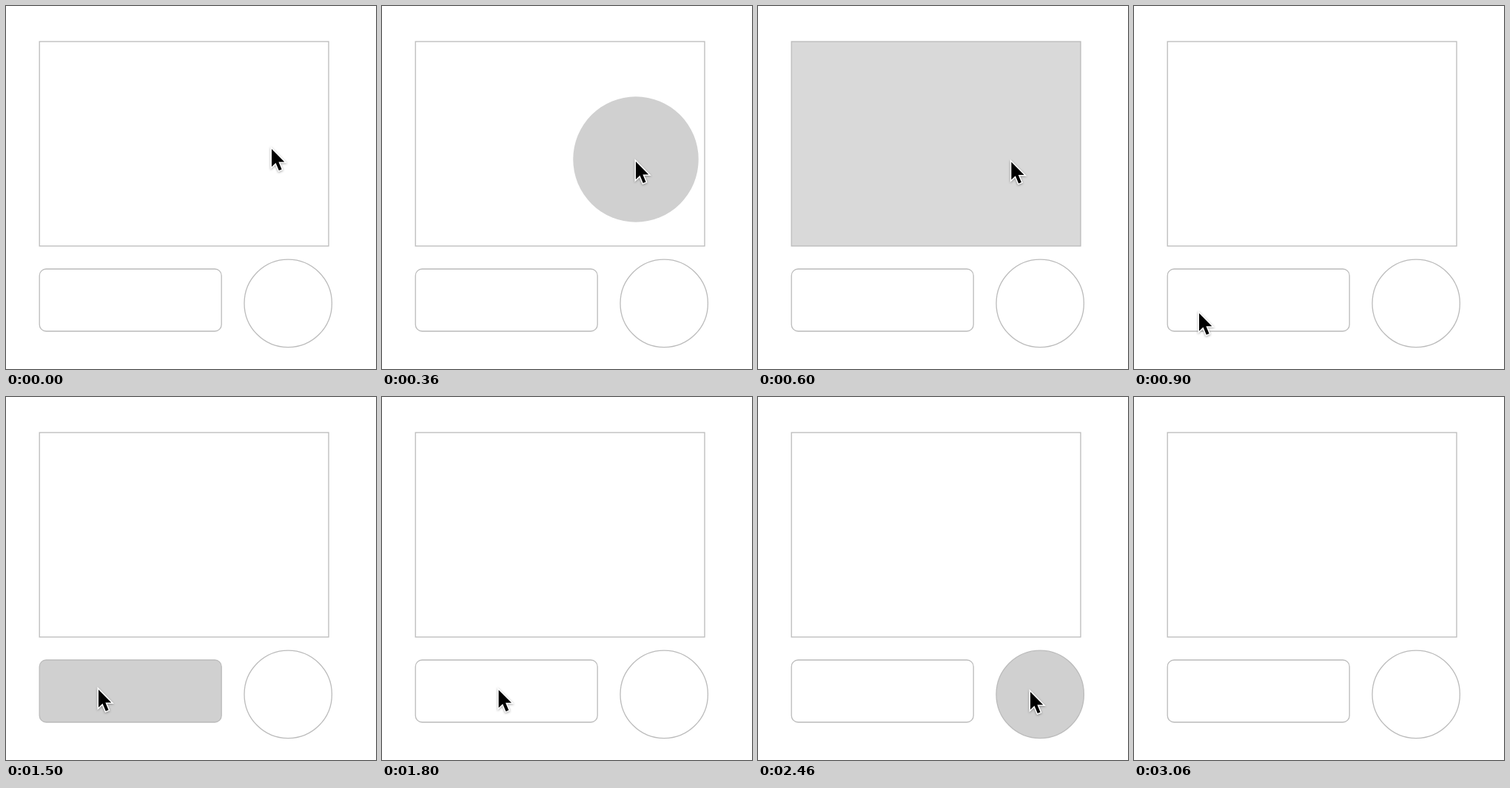
Recreate the animation shown at these times as an HTML page. Size 500 by 490 pixels, loop 3.42 s.

```html
<!DOCTYPE html>
<html lang="en">
<head>
<meta charset="utf-8">
<title>Ripple surfaces</title>
<style>
  html, body { margin: 0; width: 100%; height: 100%; overflow: hidden; background: #fff; }
  svg { display: block; width: 500px; height: 490px; }
  .outline { fill: none; stroke: #bbb; stroke-width: 1.3; }
  .ripple { fill: #d0d0d0; }
  #pointer { filter: drop-shadow(0 1.5px 1.5px rgba(0, 0, 0, .35)); }
</style>
</head>
<body>
<svg viewBox="0 0 500 490">
  <defs>
    <rect id="card" x="45.2" y="48" width="390.8" height="276"/>
    <rect id="button" x="45.2" y="355" width="246" height="84" rx="9"/>
    <circle id="disc" cx="381.2" cy="401.4" r="59.2"/>
    <clipPath id="clip-card"><use href="#card"/></clipPath>
    <clipPath id="clip-button"><use href="#button"/></clipPath>
    <clipPath id="clip-disc"><use href="#disc"/></clipPath>
  </defs>
  <g id="surfaces"></g>
  <path id="pointer" d="M0 0V24L5.5 18.8L9.8 29L13.6 27.4L9.4 17.4H17.3Z"
        fill="#000" stroke="#fff" stroke-width="3" paint-order="stroke"/>
</svg>
<script>
const LOOP = 3420, STEP = 60;
const GROW = 240, FADE = 200, FIRST_PRESS = 300, PRESS_GAP = 960;
const SVG = 'http://www.w3.org/2000/svg';
const pointer = document.getElementById('pointer');
const layer = document.getElementById('surfaces');

const entry = { x: 359, y: 193 };
const onCard = { x: 343, y: 210 };
const onButton = { x: 125, y: 395 };
const onDisc = { x: 368, y: 398 };
const exit = { x: 123, y: 497 };

// Each move rests at its end until the next one starts; `via` bends the path.
const moves = [
  { from: entry, to: onCard, start: 0, end: 240 },
  { from: onCard, to: onButton, start: 560, end: 1240, via: { x: -58, y: 527 } },
  { from: onButton, to: onDisc, start: 1600, end: 2220 },
  { from: onDisc, to: exit, start: 2600, end: 3060 }
];

const clamp = v => Math.max(0, Math.min(1, v));
const progress = (t, start, span) => clamp((t - start) / span);
const ease = k => k < .5 ? 4 * k ** 3 : 1 - 4 * (1 - k) ** 3;
const mix = (a, b, k) => ({ x: a.x + (b.x - a.x) * k, y: a.y + (b.y - a.y) * k });

function add(parent, name, attrs) {
  const node = document.createElementNS(SVG, name);
  for (const key in attrs) node.setAttribute(key, attrs[key]);
  return parent.appendChild(node);
}

// Distance from a point to the farthest corner of a shape's box
function reach(shape, { x, y }) {
  const far = (p, min, size) => Math.max(p - min, min + size - p);
  const box = shape.getBBox();
  return Math.hypot(far(x, box.x, box.width), far(y, box.y, box.height));
}

// A ripple grows where the pointer rests and fades once it leaves.
const ripples = ['card', 'button', 'disc'].map((id, i) => {
  const { x, y } = moves[i].to;
  const clip = add(layer, 'g', { 'clip-path': `url(#clip-${id})` });
  const node = add(clip, 'circle', { class: 'ripple', cx: x, cy: y - 3 });
  const outline = add(layer, 'use', { href: '#' + id, class: 'outline' });
  return {
    node,
    radius: reach(outline, { x, y }),
    press: FIRST_PRESS + PRESS_GAP * i,
    leave: moves[i + 1].start
  };
});

function pointerAt(t) {
  const { from, to, start, end, via } = moves.findLast(m => m.start <= t);
  const k = ease(progress(t, start, end - start));
  return via ? mix(mix(from, via, k), mix(via, to, k), k) : mix(from, to, k);
}

function render(t) {
  for (const { node, radius, press, leave } of ripples) {
    node.setAttribute('r', radius * progress(t, press, GROW));
    node.setAttribute('opacity', 1 - progress(t, leave, FADE));
  }
  const { x, y } = pointerAt(t);
  pointer.setAttribute('transform', `translate(${x} ${y})`);
}

const began = performance.now();
function tick() {
  const t = (performance.now() - began) % LOOP;
  render(Math.floor(t / STEP) * STEP);
  requestAnimationFrame(tick);
}
tick();
</script>
</body>
</html>
```
